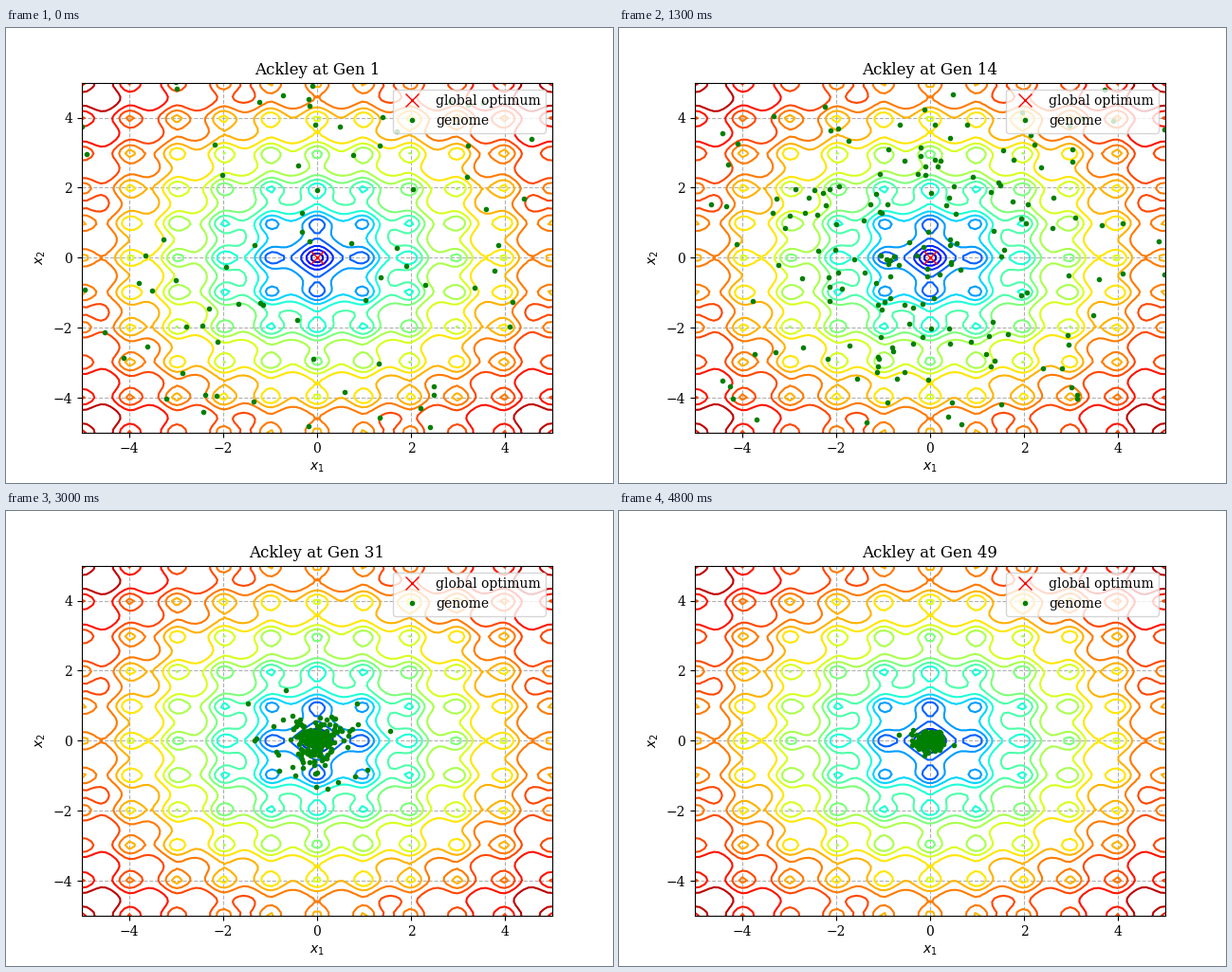
Animation of 640 by 480 pixels, one loop 4900 ms. Source, as a matplotlib script:

```python
import numpy as np
import matplotlib.pyplot as plt
from matplotlib.animation import FuncAnimation

plt.rcParams["font.family"] = "DejaVu Serif"

LIM = 5
GENS = 49
POP = 200

# Spread of the core and of the stragglers, and the share of stragglers
KEYS = [1, 10, 19, 26, 31, 49]
CORE = [6.5, 6.5, 0.62, 0.24, 0.24, 0.15]
TAIL = [6.5, 6.5, 1.10, 1.15, 0.68, 0.19]
SHARE = [0.5, 0.5, 0.5, 0.32, 0.28, 0.2]


def ackley(x, y):
    bowl = -20 * np.exp(-0.2 * np.sqrt((x**2 + y**2) / 2))
    waves = -np.exp((np.cos(2 * np.pi * x) + np.cos(2 * np.pi * y)) / 2)
    return bowl + waves + 20 + np.e


def log_interp(gen, values):
    return np.exp(np.interp(gen, KEYS, np.log(values)))


def evolve():
    """Positions of all genomes for every generation."""
    rng = np.random.default_rng(7)
    unit = rng.standard_normal((POP, 2))
    rank = np.arange(POP) / POP
    history = []
    for gen in range(1, GENS + 1):
        # Stragglers mostly drift inwards, the core is redrawn more often
        tail = rank < np.interp(gen, KEYS, SHARE)
        redraw = rng.random(POP) < np.where(tail, 0.2, 0.6)
        unit[redraw] = rng.standard_normal((redraw.sum(), 2))
        sigma = np.where(tail, log_interp(gen, TAIL), log_interp(gen, CORE))
        history.append(unit * sigma[:, None])
    return history


history = evolve()

fig, ax = plt.subplots(figsize=(6.4, 4.8), dpi=100)
axis = np.linspace(-LIM, LIM, 100)
X, Y = np.meshgrid(axis, axis)
ax.contour(X, Y, ackley(X, Y), levels=np.arange(19) * 0.8, cmap="jet")
ax.plot(0, 0, "rx", ms=10, label="global optimum")
genomes, = ax.plot([], [], "g.", label="genome")
ax.set(xlim=(-LIM, LIM), ylim=(-LIM, LIM), xlabel="$x_1$", ylabel="$x_2$")
ax.grid(ls="--")
ax.legend(loc="upper right")
title = ax.set_title("")


def update(i):
    genomes.set_data(*history[i].T)
    title.set_text(f"Ackley at Gen {i + 1}")
    return genomes, title


anim = FuncAnimation(fig, update, frames=GENS, interval=100,
                     repeat=True, repeat_delay=0)
plt.show()
```
